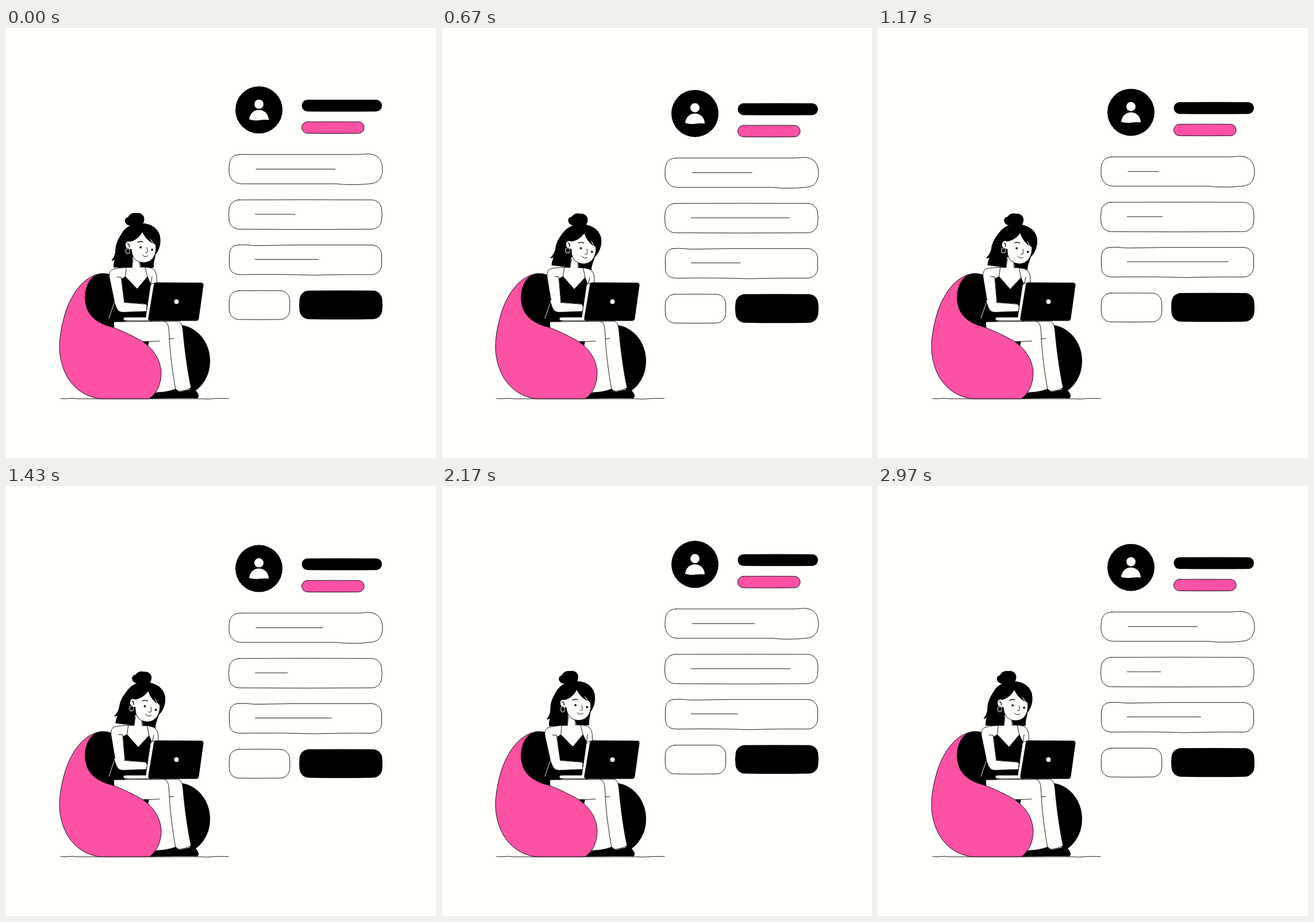
Recreate the animation shown at these times as an HTML page. Size 748 by 748 pixels, loop 3.01 s.

```html
<!DOCTYPE html>
<html lang="en">
<head>
<meta charset="utf-8">
<title>Profile form</title>
<style>
  html, body { margin: 0; width: 100%; height: 100%; overflow: hidden; background: #fffffc; }
  svg { display: block; width: 100vw; height: 100vh; }
  .ink { fill: #000; }
  .paper { fill: #fffffc; }
  .pink { fill: #fd51a4; }
  .outlined { stroke: #000; }
  .line { fill: none; stroke: #000; }
  .light { fill: none; stroke: #fffffc; }
</style>
</head>
<body>
<svg viewBox="0 0 748 748" stroke-width="0.9" stroke-linecap="round" stroke-linejoin="round">
  <path class="line" d="M95 644.500Q102 645.500 109 644.500T124 645H340Q349 646 358 645T387 644.500"/>

  <!-- chair back -->
  <path class="ink" d="M168 427C178 426 186 430 192 436L206 470V512L190 523C150 520 132 490 137 460C140 442 150 429 168 427Z"/>
  <path class="ink" d="M306 517C334 521 355 548 355 579C355 604 343 622 327 633L316 626Z"/>

  <g id="torso">
    <g id="hairBack">
      <path class="ink" d="M203 354C194 368 190 376 190 389C189 397 186 401 183 405C186 405 188 404 189 403C187 408 187 412 187 417H220L232 404L235 417H257C256 408 259 402 260 394C268 384 270 372 267 360C262 346 250 340 236 340C220 340 210 345 203 354Z"/>
    </g>
    <path class="paper" d="M221 398L219 417L206 419L222 446H234L248 419L233 417L232 402Z"/>
    <path class="paper outlined" d="M219 416.500C205 416 193 418 186 420C180 422 179 428 180 435L189 478L195 495H243L253 447L262 444C263 430 261 419 250 417C243 415.500 238 416 233 416"/>
    <path class="paper" d="M220 399L219 418H233V403Z"/>
    <path class="line" d="M221 401L219 416.500M232.500 407L233 416"/>
    <path class="ink" d="M201 436L207.500 432L228 453.500L246 432L252 445L246 483L206 478Z"/>
    <path class="line" d="M209 417.500L207.500 433M242 416.500L246 433M193 433L200 433.500L206 478M254 432L252 445"/>
  </g>

  <!-- forearm and waist -->
  <path class="ink" d="M190 482L179 505L189 509L206 510L244 505V493H203Z"/>
  <path class="paper" d="M188 474L193 488Q195 494 203 494.500L244 493V480L206 477Z"/>
  <path class="line" d="M206 477.500L244 480.500M193 488Q195 494 203 494.500L244 493"/>
  <path class="light" d="M188 479L179 505"/>

  <!-- legs and shoes -->
  <path class="ink" d="M246 645C251 637 260 634 273 633L299 627L302 633L328 627C330 632 336 636 335 641C335 644 332 645 328 644H300Z"/>
  <path class="paper outlined" d="M188 511L300 510C306 513 307 519 308 528C311 562 316 598 322 626C314 630 308 631 300 632L295 628C282 633 271 634 258 634L246 552L188 522Z"/>
  <path class="line" d="M275 510.500C284 512 283 524 284 536C285 565 290 600 295 629M242 546L267 544.500M284 541L292 540"/>
  <path class="ink" d="M238 545H249L247 554Z"/>

  <path class="pink outlined" d="M168 427C137 429 114 461 103 496C96 520 93 538 93 557C95 605 122 640 164 645H249C262 636 270 620 270 600C269 574 253 554 232 542C213 532 202 527 187 521C164 515 148 506 141 488C135 472 137 452 147 438C152 431 159 428 168 427Z"/>

  <!-- laptop -->
  <path class="paper outlined" d="M208 503H243L251 449Q252 444 257 444H267L255 509H208Q204 509 204 506T208 503Z"/>
  <path class="ink" d="M262 442.500L339 443Q344 443 343.500 448L335.500 505Q335 509.500 330 509.500H252Q246.500 509.500 247.500 504L257 447Q257.500 442.500 262 442.500Z"/>
  <circle class="paper" cx="296.500" cy="476" r="4"/>

  <g id="head">
    <path class="ink" d="M210 342C204 337 206 330 212 329C214 323 221 321 226 322C235 320 241 327 240 333C240 338 238 341 235 343Q222 348 210 342Z"/>
    <path class="ink" d="M201 358C209 344 222 340 238 340C257 341 269 354 268 369C268 376 264 380 261 386L245 394H219L200 390Z"/>
    <path class="paper" d="M215 372L219 371C227 368 233 362 237 355C241 364 247 370 254 374L249 364Q254 372 260 376C263 395 254 408 239 408C226 408 219 399 218 386Z"/>
    <path class="line" d="M260 376C263 395 254 408 239 408C226 408 219 399 218 386"/>
    <path class="paper" d="M217 373C212 369 207 373 208 378C208 383 213 386 218 384Z"/>
    <path class="line" d="M211 375Q215 376 214 381M229 373Q233 370 238 372M252 372.500Q256 372 259 376" stroke-width="1.300"/>
    <ellipse class="light" cx="211.500" cy="388" rx="3.500" ry="4.500" stroke-width="2"/>
    <ellipse class="line" cx="211.500" cy="388" rx="3.500" ry="4.500"/>
    <circle class="ink" cx="234" cy="381.500" r="1.900"/>
    <circle class="ink" cx="254" cy="385.500" r="1.900"/>
    <path class="line" d="M245 382C245 386 247 388 246 390Q244 391.500 242 390.500M237 395Q242 400 247 396"/>
  </g>

  <g id="panel">
    <circle class="ink" cx="440" cy="142.500" r="41"/>
    <circle class="paper" cx="440" cy="132.500" r="8"/>
    <path class="paper" d="M423 159C424 149 431 142.500 440 142.500C449 142.500 457 149 457 160Q449 159 440 160.500Q430 161.500 423 159Z"/>
    <path class="line" d="M407 220H610C624 220 626 218 636 219.500C649 222 655 232 655 247C654 262 648 270 632 271C615 273 590 273 575 271H410C394 271 387 258 388 246C388 229 392 221 407 220Z"/>
    <path class="line" d="M403 377.500C418 376 426 379 440 378.500Q500 377 560 377.500H636A17.500 17.500 0 0 1 653.500 395V411.500A17.500 17.500 0 0 1 636 429Q580 428.500 535 430Q480 428 410 429C394 429 389 423 388.500 411V395C389 384 394 378 403 377.500Z"/>
    <path id="nameBar" class="ink"/>
    <path id="roleBar" class="pink outlined"/>
    <path id="secondBox" class="line"/>
    <path id="cancelButton" class="line"/>
    <path id="saveButton" class="ink"/>
    <path class="line" id="entry1"/>
    <path class="line" id="entry2"/>
    <path class="line" id="entry3"/>
  </g>
</svg>
<script>
const LOOP = 3010;
const STEPS = 90;
const CYCLE = 91;
const TURN = 2 * Math.PI / CYCLE;
const part = id => document.getElementById(id);

// [step, value] pairs joined by cosine easing
const SWAY = [[0, 0.03], [12, 1.2], [22, 1], [46, 1], [64, -0.25], [75, 0], [91, 0.03]];

function ease(keys, step) {
  const i = keys.findIndex(([at]) => at > step);
  const [from, a] = keys[i - 1];
  const [to, b] = keys[i];
  const p = (step - from) / (to - from);
  return a + (b - a) * (1 - Math.cos(Math.PI * p)) / 2;
}

// Rounded box whose long and short sides bow outwards a little
function drawSlab(id, left, top, right, bottom, r, bow) {
  const midX = (left + right) / 2;
  const midY = (top + bottom) / 2;
  const corner = (x, y) => `A${r} ${r} 0 0 1 ${x} ${y}`;
  part(id).setAttribute("d",
    `M${left + r} ${top}Q${midX} ${top - bow / 2} ${right - r} ${top}${corner(right, top + r)}` +
    `Q${right + bow} ${midY} ${right} ${bottom - r}${corner(right - r, bottom)}` +
    `Q${midX} ${bottom + bow} ${left + r} ${bottom}${corner(left, bottom - r)}` +
    `Q${left - bow} ${midY} ${left} ${top + r}${corner(left + r, top)}Z`);
}

function setEntry(id, x, y, length) {
  part(id).setAttribute("d", `M${x} ${y}h${length}`);
}

function render(time) {
  const step = Math.min(STEPS - 1, Math.floor((time % LOOP + 10) * STEPS / LOOP));
  const angle = TURN * step;
  const sway = ease(SWAY, step);
  const lean = `rotate(${2.5 * sway} 215 500)`;
  const nod = `rotate(${4.2 * sway} 228 412)`;
  part("torso").setAttribute("transform", lean);
  part("hairBack").setAttribute("transform", nod);
  part("head").setAttribute("transform", `${lean} ${nod}`);

  part("panel").setAttribute("transform", `translate(0 ${6.3 * Math.sin(angle)})`);
  setEntry("entry1", 435, 245.5, 109 + 66 * Math.sin(2 * angle + 0.45));
  setEntry("entry2", 433.5, 324, 113 + 64 * Math.sin(2 * angle - 0.75));
  setEntry("entry3", 433.5, 402.5, 110 - 66 * Math.sin(2 * angle));
}

drawSlab("nameBar", 514.5, 124.8, 654, 145.2, 10, 0.5);
drawSlab("roleBar", 514.5, 163.2, 623, 183.2, 9.8, 0.5);
drawSlab("secondBox", 388, 299, 653.5, 350, 17.5, 1);
drawSlab("cancelButton", 388.5, 457, 493.5, 507, 16.5, 0.6);
drawSlab("saveButton", 510.5, 456.8, 654.5, 506.5, 16.5, 1);

const start = performance.now();
function tick() {
  render(performance.now() - start);
  requestAnimationFrame(tick);
}
tick();
</script>
</body>
</html>
```
